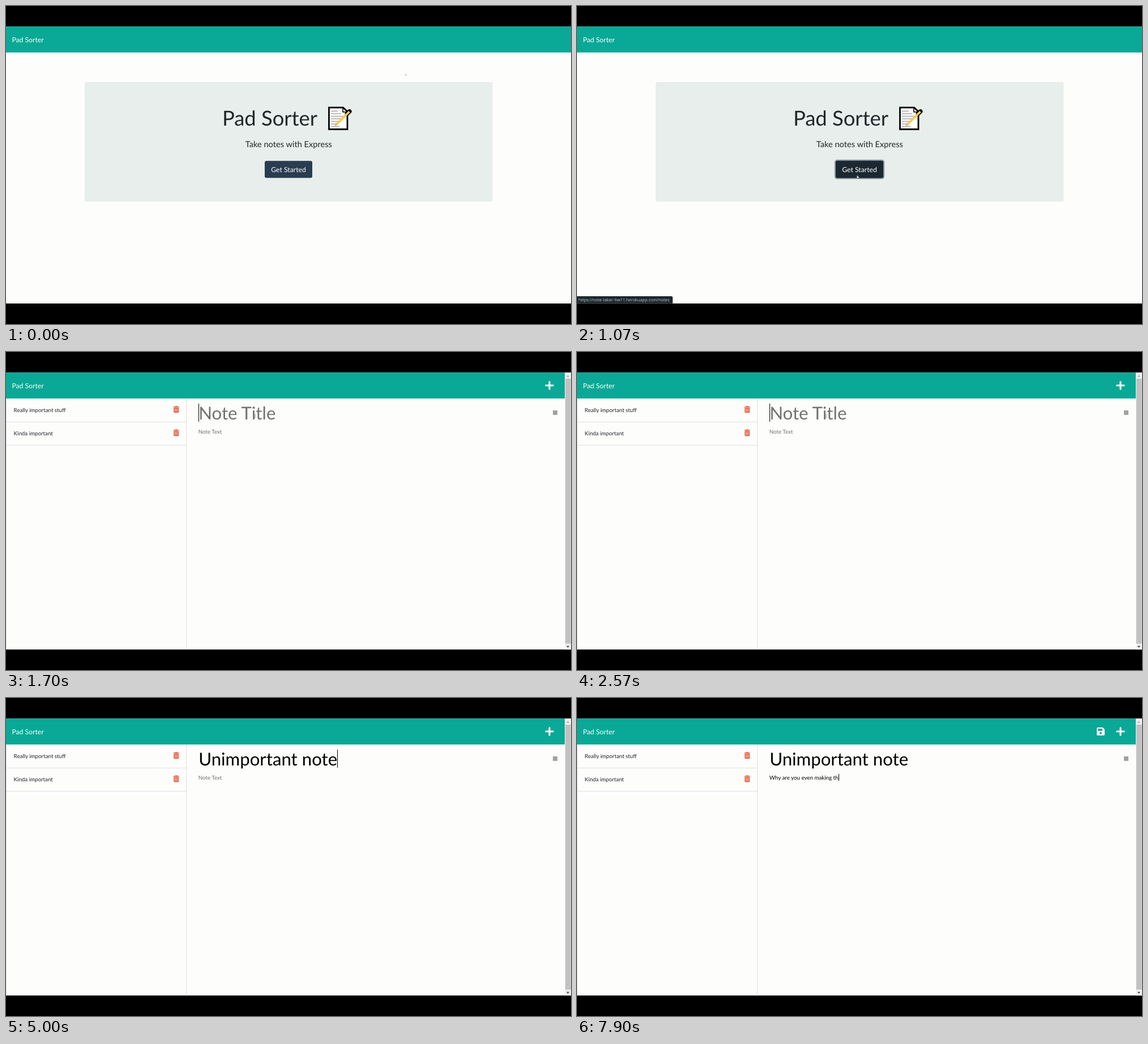
These frames come from a looping animation (998x561 px, 8000 ms). An HTML page:

```html
<!DOCTYPE html>
<html lang="en">
<head>
<meta charset="utf-8">
<title>Pad Sorter</title>
<style>
html, body { margin: 0; width: 100%; height: 100%; overflow: hidden; background: #000; }
svg { display: block; width: 100vw; height: 100vh; }
text { font-family: Lato, sans-serif; white-space: pre; text-rendering: geometricPrecision; }
.brand { font-size: 12.19px; fill: #fff; }
.mid { text-anchor: middle; }
.item { font-size: 9.75px; fill: #212529; }
.title { font-size: 31.2px; }
.body { font-size: 9.75px; }
.url { font: 7.4px "Open Sans", "Noto Sans", sans-serif; fill: #c3cacd; }
.rule { stroke: #e0e0e4; }
</style>
</head>
<body>
<svg viewBox="0 0 998 561">
  <defs>
    <g id="trash">
      <path d="M3.4 .3h3.4l.5 .9h2.9v1.4H0V1.2h2.9z"/>
      <path d="M.7 3.3h8.8v7.6q0 1.2-1.2 1.2H1.9Q.7 12.1.7 10.9z"/>
      <path d="M2.9 4.8v5.6M5.1 4.8v5.6M7.3 4.8v5.6" stroke="#fdfdfd" stroke-width=".8"/>
    </g>
  </defs>

  <rect width="998" height="561"/>
  <rect y="36.2" width="998" height="488.6" fill="#fdfdfc"/>
  <rect y="36.2" width="998" height="45.8" fill="#0aa896"/>
  <text class="brand" x="10.4" y="64">Pad Sorter</text>

  <g id="home">
    <rect x="139" y="134" width="720.5" height="211" rx="3" fill="#e7eeeb"/>
    <text x="382" y="211" font-size="36.4" fill="#212529">Pad Sorter</text>
    <g fill="none" stroke="#000">
      <path d="M570.5 179.2h25l7.5 7v31.3h-32.5z" fill="#fff" stroke-width="2.8"/>
      <path d="M595 179v8h8" stroke-width="1.6"/>
      <path d="M574 185.5h12M574 190h18M574 194.5h22M574 199h21M574 203.5h18M574 208h10M574 212.5h15"
            stroke="#a5a5a5" stroke-width="1.3"/>
      <path d="M602.5 190l4.2-4" stroke-width="7.6" stroke-linecap="round"/>
      <path d="M584 208.3l22.5-22" stroke="#f8cd4a" stroke-width="3.8"/>
      <path d="M580.5 211.8l1.8-5 3.2 3.2z" fill="#d9a878" stroke="none"/>
    </g>
    <text class="mid" x="499.3" y="249" font-size="14.63" fill="#212529">Take notes with Express</text>
    <rect id="ring" x="454.9" y="271.1" width="88.2" height="34.2" rx="4.5" fill="#89959d"/>
    <rect id="button" x="457" y="273.2" width="84" height="30" rx="3" fill="#293d50"/>
    <rect id="hover" x="457" y="273.2" width="84" height="30" rx="3" fill="#1b2731"/>
    <text class="mid" x="499" y="292.5" font-size="12.19" fill="#fff">Get Started</text>
  </g>

  <g id="notes">
    <path class="rule" d="M.5 82v442.8M318.5 82v442.8"/>
    <path d="M960 52.8v12.4M953.8 59h12.4" stroke="#fff" stroke-width="3.1" stroke-linecap="round"/>
    <g id="save">
      <path d="M919.7 52h9l3.3 3.3v9.2q0 1.5-1.5 1.5h-10.8q-1.5 0-1.5-1.5v-11q0-1.5 1.5-1.5z" fill="#fff"/>
      <path d="M920.2 54h7.8v3.9h-7.8z" fill="#0aa896"/>
      <circle cx="925" cy="62" r="2" fill="#0aa896"/>
    </g>
    <g id="list">
      <path class="rule" d="M1 123.5h317M1 164.5h317"/>
      <text class="item" x="13.6" y="106">Really important stuff</text>
      <text class="item" x="13.6" y="147.2">Kinda important</text>
      <g fill="#e2583c">
        <use href="#trash" x="295.6" y="95"/>
        <use href="#trash" x="295.6" y="136.2"/>
      </g>
    </g>
    <text id="title" class="title" x="340.2" y="118.5"></text>
    <text id="body" class="body" x="339.8" y="143.6"></text>
    <rect id="caret" width="1"/>
    <rect id="badge" x="966" y="103" width="8" height="8" fill="#a2a2a2"/>
    <rect x="987" y="36.2" width="11" height="488.6" fill="#f1f1f1"/>
    <rect x="988" y="47" width="9.5" height="467.5" fill="#c1c1c1"/>
    <path d="M989.8 43.8l2.7-3 2.7 3z" fill="#a3a3a3"/>
    <path d="M989.8 518.4l2.7 3 2.7-3z" fill="#404040"/>
  </g>

  <g id="status">
    <path d="M0 512h166.5q2.5 0 2.5 2.5v10.3H0z" fill="#1d282e"/>
    <text class="url" x="2.8" y="521.3">https://note-taker-hw11.herokuapp.com/notes</text>
  </g>

  <path id="arrow" d="M-.7-2v3.6l.9-.8.6 1.4.7-.4-.6-1.2h1z" fill="#fff" stroke="#999" stroke-width=".4"/>
  <path id="hand" d="M-.7-2v2.5l-.8.2 1.2 1.8h2l.4-2.2-2-.6V-2z" fill="#fff"/>
  <path id="beam" d="M-1.2-2.5h2.4M0-2.5v5M-1.2 2.5h2.4" fill="none" stroke="#777" stroke-width=".7"/>
</svg>
<script>
const LOOP = 8000, OPEN = 1100, TITLE_FOCUS = 1510, BODY_FOCUS = 5100, BLINK = 530;
const el = Object.fromEntries([...document.querySelectorAll("[id]")].map(e => [e.id, e]));

// Each burst types its text at an even pace.
const burst = (text, start, pace) => [...text].map((char, i) => ({ char, at: start + i * pace }));

const title = {
  node: el.title, hint: "Note Title", top: 91, height: 32, focus: TITLE_FOCUS,
  keys: [...burst("Uni", 2800, 115), ...burst("mportant", 3400, 93), ...burst(" note", 4230, 140)]
};
const body = {
  node: el.body, hint: "Note Text", top: 134, height: 12, focus: BODY_FOCUS,
  keys: [...burst("Why are ", 5480, 98), ...burst("you ev", 6500, 150), ...burst("en making th", 7400, 44)]
};

const pointer = [
  { at: 30, x: 706, y: 121 }, { at: 200, x: 562, y: 361 }, { at: 340, x: 562, y: 361 },
  { at: 370, x: 493, y: 300 }, { at: 1070, x: 496, y: 300 },
  { at: OPEN, x: 481, y: 325 }, { at: 1480, x: 440, y: 113 }
];

const ramp = (t, from, to) => Math.min(1, Math.max(0, (t - from) / (to - from)));
const show = (node, on) => node.style.display = on ? "" : "none";

function pointerAt(t) {
  let { x, y } = pointer[0];
  for (let i = 1; i < pointer.length; i++) {
    const k = ramp(t, pointer[i - 1].at, pointer[i].at);
    x += (pointer[i].x - pointer[i - 1].x) * k;
    y += (pointer[i].y - pointer[i - 1].y) * k;
  }
  return [x, y];
}

function type(field, t) {
  const typed = field.keys.filter(k => k.at <= t);
  field.node.textContent = typed.map(k => k.char).join("") || field.hint;
  field.node.setAttribute("fill", typed.length ? "#000" : "#717171");
  return typed;
}

function placeCaret(field, typed, t) {
  const last = typed.length ? typed[typed.length - 1].at : field.focus;
  show(el.caret, t >= last && (t - last) % (2 * BLINK) < BLINK);
  const width = typed.length ? field.node.getComputedTextLength() : 0;
  el.caret.setAttribute("x", Math.round(340 + width));
  el.caret.setAttribute("y", field.top);
  el.caret.setAttribute("height", field.height);
}

function drawNotes(t) {
  show(el.list, t >= 1200);
  show(el.badge, t >= 1600);
  const titleKeys = type(title, t), bodyKeys = type(body, t);
  show(el.save, bodyKeys.length > 0);
  if (t < BODY_FOCUS) placeCaret(title, titleKeys, t);
  else placeCaret(body, bodyKeys, t);
}

function draw(t) {
  const home = t < OPEN, over = t >= 370;
  show(el.home, home);
  show(el.notes, !home);
  show(el.ring, t >= 1000);
  el.hover.style.opacity = ramp(t, 570, 720);
  show(el.status, t >= 600);
  el.status.style.opacity = home ? 1 : .55 * (1 - ramp(t, 1130, 1230));
  if (!home) drawNotes(t);

  const [x, y] = pointerAt(t);
  show(el.arrow, home && !over);
  show(el.hand, home && over);
  show(el.beam, !home && t < title.keys[0].at);
  for (const c of [el.arrow, el.hand, el.beam]) c.setAttribute("transform", `translate(${x} ${y})`);
}

const start = performance.now();
function tick() {
  draw((performance.now() - start) % LOOP);
  requestAnimationFrame(tick);
}
tick();
</script>
</body>
</html>
```
